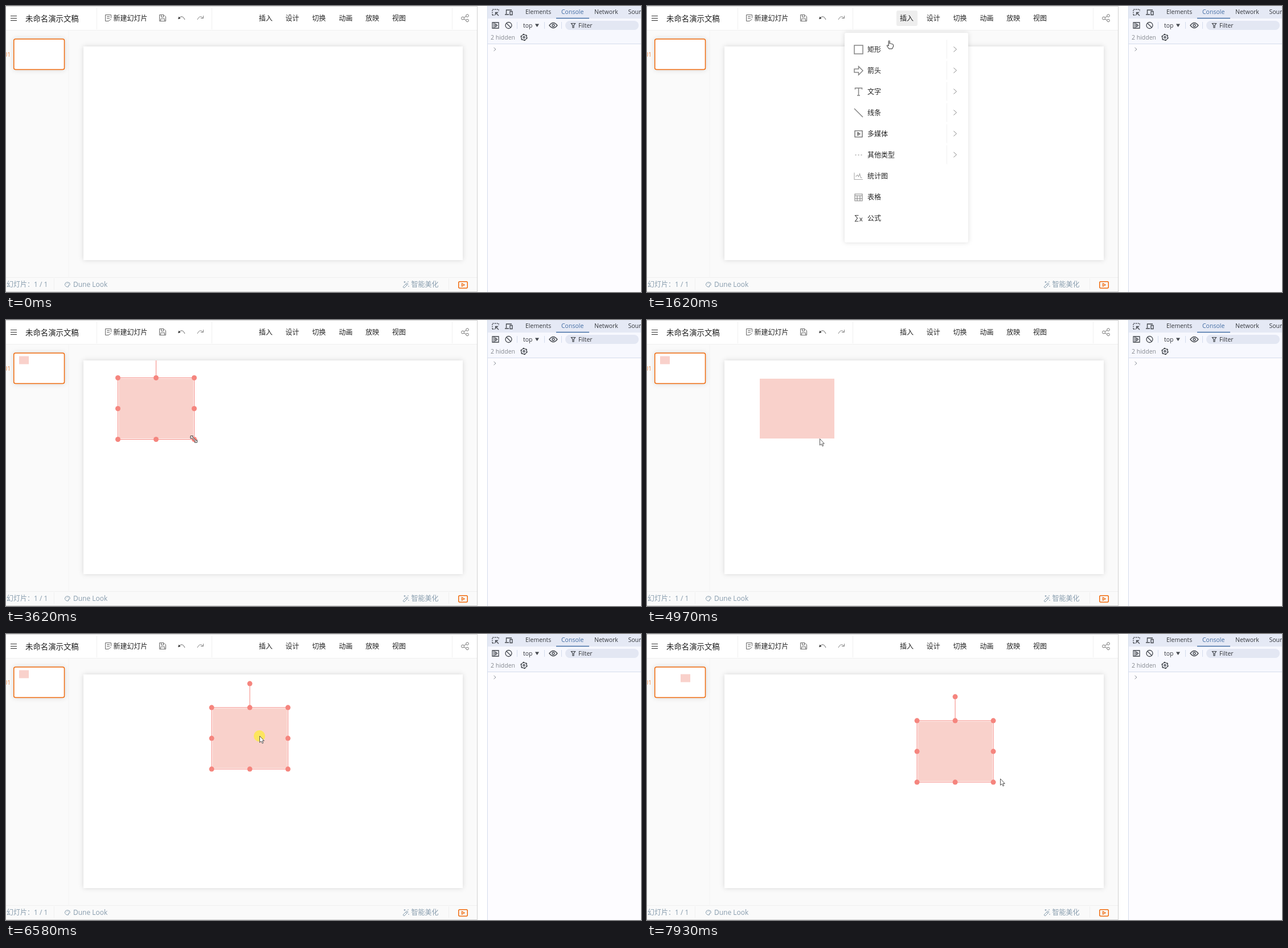
An HTML page that plays this animation: 1115 px wide and 502 px high, repeating every 8 s.

```html
<!DOCTYPE html>
<html lang="zh-CN">
<head>
<meta charset="utf-8">
<style>
html, body { margin: 0; width: 100%; height: 100%; overflow: hidden; background: #fff; }
svg { display: block; width: 1115px; height: 502px; font: 12px "Open Sans", "Noto Sans CJK SC", "Noto Sans CJK JP", sans-serif; }
.cjk, .status.zh { font-family: "Noto Sans CJK SC", "Noto Sans CJK JP", sans-serif; }
.cjk { fill: #222; }
.dev { font-size: 10.5px; fill: #34373c; }
.status { fill: #879cad; }
.line { fill: none; stroke: #666; }
.rule { fill: none; stroke: #f0f0f0; }
.shadow { filter: drop-shadow(0 0 4px rgba(0,0,0,.14)); }
</style>
</head>
<body>
<svg viewBox="0 0 1115 502">
  <defs><clipPath id="slideClip"><rect x="136" y="71" width="666" height="375"/></clipPath></defs>

  <!-- editor -->
  <rect y="42" width="828" height="460" fill="#fafafa"/>
  <path class="rule" d="M0 42.5H828M0 476.5H828M159.5 3V41M361.5 3V41M783.5 3V41M84.5 478V498M777.5 478V498"/>
  <path d="M110 43V476" stroke="#f3f3f3"/>
  <path d="M0 .5H827.5V501.5H0" fill="none" stroke="#d0d0d0"/>
  <rect class="shadow" x="136" y="71" width="666" height="375" fill="#fff"/>

  <!-- toolbar -->
  <path class="line" stroke-width="1.2" style="stroke:#333" d="M8 17.5H19M8 21.5H19M8 25.5H19"/>
  <text class="cjk" x="34" y="27" font-size="13.4">未命名演示文稿</text>
  <path class="line" d="M184.5 21V15.5H174.5V26.5H180M177 18.5H182M177 21.5H182M180 26.5L184.5 23"/>
  <text class="cjk" x="188.5" y="26">新建幻灯片</text>
  <path class="line" d="M269.5 15.5H277L280.5 19V26.5H269.5ZM272.5 15.5V19.5H276.5V15.5M271.5 26.5V22.5H278.5V26.5"/>
  <path class="line" d="M304 21Q310 15 314 24"/>
  <path d="M302 23L303.5 18.500L306.500 22Z" fill="#333"/>
  <path class="line" style="stroke:#888" d="M336 24Q340 15 346 21M346.5 17V21.5H342"/>
  <g id="tabs"><rect id="hover" x="438" y="8" width="37" height="27" rx="3" fill="#eee"/></g>
  <g class="line" style="stroke:#777">
    <path d="M804 20.5L808 18M804 23L808 25"/>
    <circle cx="802" cy="21.5" r="2.5"/><circle cx="810" cy="17" r="2.3"/><circle cx="810" cy="25.5" r="2.3"/>
  </g>

  <!-- thumbnail -->
  <text x="-3.5" y="89" font-size="10" fill="#f28a45">01</text>
  <rect class="shadow" x="13.75" y="58" width="88.75" height="53.5" rx="3" fill="#fff" stroke="#f06a0c" stroke-width="1.5"/>
  <rect id="thumb" width="17" height="14" fill="#f9d1cb"/>

  <!-- status bar -->
  <text class="status zh" x="1" y="493">幻灯片：</text>
  <text class="status" x="49" y="493">1 / 1</text>
  <path d="M106.5 492.5A4.500 4 0 1 1 112.500 488.500Q112.500 490.500 109.500 490.500V493H106.500ZM105.500 488H106.500M108 486.500H109M110 488H111" fill="none" stroke="#879cad"/>
  <text class="status" x="118" y="493">Dune Look</text>
  <path d="M697 493L704 486L706 488L699 495ZM702 488L704 490M700 483V486M698.5 484.5H701.5M706 483V485M707 491V493" fill="none" stroke="#879cad"/>
  <text class="status zh" x="711.5" y="493">智能美化</text>
  <rect x="794.75" y="483.75" width="15.5" height="11.5" rx="2" fill="none" stroke="#f06a0c" stroke-width="1.5"/>
  <path d="M800.5 487L805 489.5L800.5 492Z" fill="none" stroke="#f06a0c" stroke-width="1.3"/>

  <!-- developer tools -->
  <rect x="845" width="270" height="502" fill="#fdfcff"/>
  <rect x="845" width="270" height="67" fill="#f7f8fe"/>
  <rect x="845" width="270" height="22" fill="#e5e9f5"/>
  <path d="M845.5 0V502M846 66.5H1115" stroke="#d4dcec" fill="none"/>
  <path d="M966 21.5H1024" stroke="#426da3" stroke-width="1.5"/>
  <g class="dev">
    <text x="912" y="14">Elements</text><text x="975" y="14" fill="#426da3">Console</text>
    <text x="1033" y="14">Network</text><text x="1092.5" y="14">Sources</text>
    <text x="908" y="37.5">top</text><text x="851" y="59" fill="#85898f">2 hidden</text>
  </g>
  <g class="line" style="stroke:#42464c" stroke-width="1.3">
    <path d="M854 16V6H865V10" stroke-dasharray="2 1.5"/><path d="M854 16H858" stroke-dasharray="2 1"/>
    <path d="M865 17L859.5 11.5M859.5 16V11.5H864"/>
    <path d="M888 7H878.5V14M876 15H883M885 9.5H889V15.5H885Z"/>
    <path d="M854 29H865V39H854ZM857 29V39M859.5 31.5L862.5 34L859.5 36.5Z"/>
    <circle cx="882.5" cy="34" r="5.5"/><path d="M878.5 30L886.5 38"/>
    <path d="M954 34Q961 25 968 34Q961 43 954 34Z"/><circle cx="961" cy="34" r="2"/>
    <circle cx="909.5" cy="55" r="4.7"/><circle cx="909.5" cy="55" r="1.5"/>
    <circle cx="909.5" cy="55" r="5.6" stroke-dasharray="2.9 2.96"/>
  </g>
  <path d="M929 31.5H936L932.5 37Z" fill="#42464c"/>
  <path d="M897.5 28V40M945.5 28V40M975.5 28V40" stroke="#d4dcec"/>
  <rect x="982" y="26" width="129" height="16" rx="8" fill="#e3e7f3"/>
  <path class="line" style="stroke:#42464c" stroke-width="1.2" d="M992.5 30.5H999.5L997 34V38H995V34Z"/>
  <text class="dev" x="1005" y="37.5">Filter</text>
  <path class="line" style="stroke:#8a8f98" d="M856.5 73L860 76L856.5 79"/>

  <!-- drawn box and selection -->
  <g clip-path="url(#slideClip)">
    <rect id="box" fill="#f9d1cb"/>
    <g id="frame" fill="#f5857e"></g>
  </g>

  <!-- insert menu -->
  <g id="menu"><rect class="shadow" x="347" y="47" width="217" height="368" rx="3" fill="#fff"/></g>

  <g id="cursor">
    <circle id="press" r="10" fill="#ffef2b" opacity=".68"/>
    <path id="arrow" d="M.5 0V11.5L3 9L5 13L6.8 12.2L5 8.5H8.3Z" fill="#fff" stroke="#444" stroke-width=".9"/>
    <path id="hand" d="M-1 1.5Q0 -.5 1 1.5V6Q2.5 4.8 3.3 6.5Q5 5.5 5.5 7Q7.3 6.5 7.3 8.5V11L5.5 15H-.5L-4 9.5Q-3.5 7.5 -1 10Z" fill="#fff" stroke="#222"/>
    <path id="cross" d="M-8 0H8M0 -8V8" stroke="#222" stroke-width="1.3"/>
    <path id="resize" d="M-6 -5.5H-1.5L-2.5 -3.5L3.5 2.5L5.5 1.5V6H1L2.5 4L-3.5 -2L-6 -1Z" fill="#fff" stroke="#222" stroke-width=".9"/>
  </g>
</svg>
<script>
const $ = id => document.getElementById(id);
const add = (parent, markup) => $(parent).insertAdjacentHTML('beforeend', markup);
const show = (id, on) => $(id).setAttribute('visibility', on ? 'inherit' : 'hidden');
const place = (id, x, y) => $(id).setAttribute('transform', `translate(${x} ${y})`);

['插入', '设计', '切换', '动画', '放映', '视图'].forEach((s, i) =>
  add('tabs', `<text class="cjk" x="${444 + i * 46.8}" y="26">${s}</text>`));

const icons = [
  'M-7.5 -7.5H7.5V7.5H-7.5Z', 'M-7.5 -3H0V-7.5L7.5 0L0 7.5V3H-7.5Z',
  'M-6 -4V-6.5H6V-4M0 -6.5V6.5M-2.5 6.5H2.5', 'M-7.5 -7.5L7.5 7.5',
  'M-6.5 -5.5H6.5V5.5H-6.5ZM-1.5 -2.5L2.5 0L-1.5 2.5Z', 'M-6 0H-4M-1 0H1M4 0H6',
  'M-7.5 -6V6H7.5M-5 1L-2 -2L0 1L2 -4L4 3H6',
  'M-6.5 -5.5H6.5V6.5H-6.5ZM-6.5 -2.5H6.5M-6.5 2.5H6.5M-2.5 -2.5V6.5M2.5 -2.5V6.5',
  'M0 -5H-6L-2 0L-6 5.5H0M2 -1L6.5 5.5M6.5 -1L2 5.5'];
['矩形', '箭头', '文字', '线条', '多媒体', '其他类型', '统计图', '表格', '公式'].forEach((s, i) => {
  const y = 76.5 + i * 37;
  const color = i == 4 || i == 8 ? '#444' : i == 6 ? '#aaa' : '#858585';
  add('menu', `<path d="${icons[i]}" transform="translate(371.5 ${y})" fill="none" stroke="${color}" stroke-width="${i < 4 ? 1.5 : 1.1}"/>
    <text class="cjk" x="387" y="${y + 4.2}">${s}</text>`);
  if (i < 6) add('menu', `<path class="rule" d="M526.5 ${y - 17}V${y + 16}"/>
    <path d="M538.5 ${y - 5}L543.5 ${y - .5}L538.5 ${y + 4}" fill="none" stroke="#888"/>`);
});

// selection, relative to its top left corner
add('frame', '<path d="M.5 .5H134.5V108.5H.5ZM67.5 .5V-42" fill="none" stroke="#f5857e"/><circle cx="67.5" cy="-41.5" r="4.5"/>');
for (let i = 0; i < 9; i++)
  if (i != 4) add('frame', `<circle cx="${.5 + i % 3 * 67}" cy="${.5 + (i / 3 | 0) * 54}" r="4.5"/>`);

// progress from time a to b in n equal steps; the first step shows at a
const steps = (t, a, b, n) =>
  t < a ? 0 : t >= b ? 1 : (Math.floor((t - a) / (b - a) * (n - 1) + 1e-6) + 1) / n;

// moves: [start, end, steps, x, y]
function follow(t, x, y, moves) {
  for (const [a, b, n, toX, toY] of moves) {
    const p = steps(t, a, b, n);
    x += (toX - x) * p;
    y += (toY - y) * p;
  }
  return [x, y];
}

const before = [
  [120, 870, 12, 449, 17], [940, 1680, 12, 423, 64],
  [1750, 1960, 4, 400, 74], [2070, 2500, 7, 198, 104]];
const after = [
  [4150, 4490, 6, 330, 257], [4770, 5170, 6, 276, 160], [5840, 6100, 4, 268, 151],
  [6240, 6580, 6, 445, 179], [6650, 6850, 4, 546, 202], [7730, 7930, 4, 620, 254]];
const drag = [[6240, 6580, 6, 164.6, 27.6], [6650, 6850, 4, 277.6, 50.6]];
const presses = [[1890, 2040], [2570, 3550], [4630, 4770], [5370, 5510], [6100, 7460]];

function render(t) {
  const within = (a, b) => t >= a && t < b;
  const left = 1 - steps(t, 2570, 3350, 12);
  const ease = k => 1 - left ** k;

  let [x, y] = t < 2570 ? follow(t, 1024, 518, before) : follow(t, 330, 209, after);
  if (within(2570, 3550)) {
    x = 198 + 132 * ease(1.9);
    y = 104 + 105 * ease(1.46);
  }
  const kind = t < 870 ? 'arrow' : t < 2040 ? 'hand' : t < 3550 ? 'cross' : t < 4220 ? 'resize' : 'arrow';
  for (const k of ['arrow', 'hand', 'cross', 'resize']) show(k, k == kind);
  show('press', presses.some(([a, b]) => within(a, b)));
  show('cursor', t >= 120);
  place('cursor', x, y);

  show('hover', within(870, 2040));
  $('menu').setAttribute('opacity', steps(t, 940, 1080, 3) - steps(t, 2040, 2180, 3));

  const [dx, dy] = follow(t, 0, 0, drag);
  const box = $('box');
  box.setAttribute('x', 198 + dx);
  box.setAttribute('y', 103 + dy);
  box.setAttribute('width', 131 * ease(1.79));
  box.setAttribute('height', 105 * ease(1.4));
  show('frame', t >= 3550 && !within(4700, 5440));
  place('frame', 196 + dx, 101 + dy);

  show('thumb', t >= 3620);
  place('thumb', t < 7460 ? 23 : 59, t < 7460 ? 63.5 : 70.5);
}

const begin = performance.now();
(function tick() {
  render((performance.now() - begin) % 8000);
  requestAnimationFrame(tick);
})();
</script>
</body>
</html>
```
